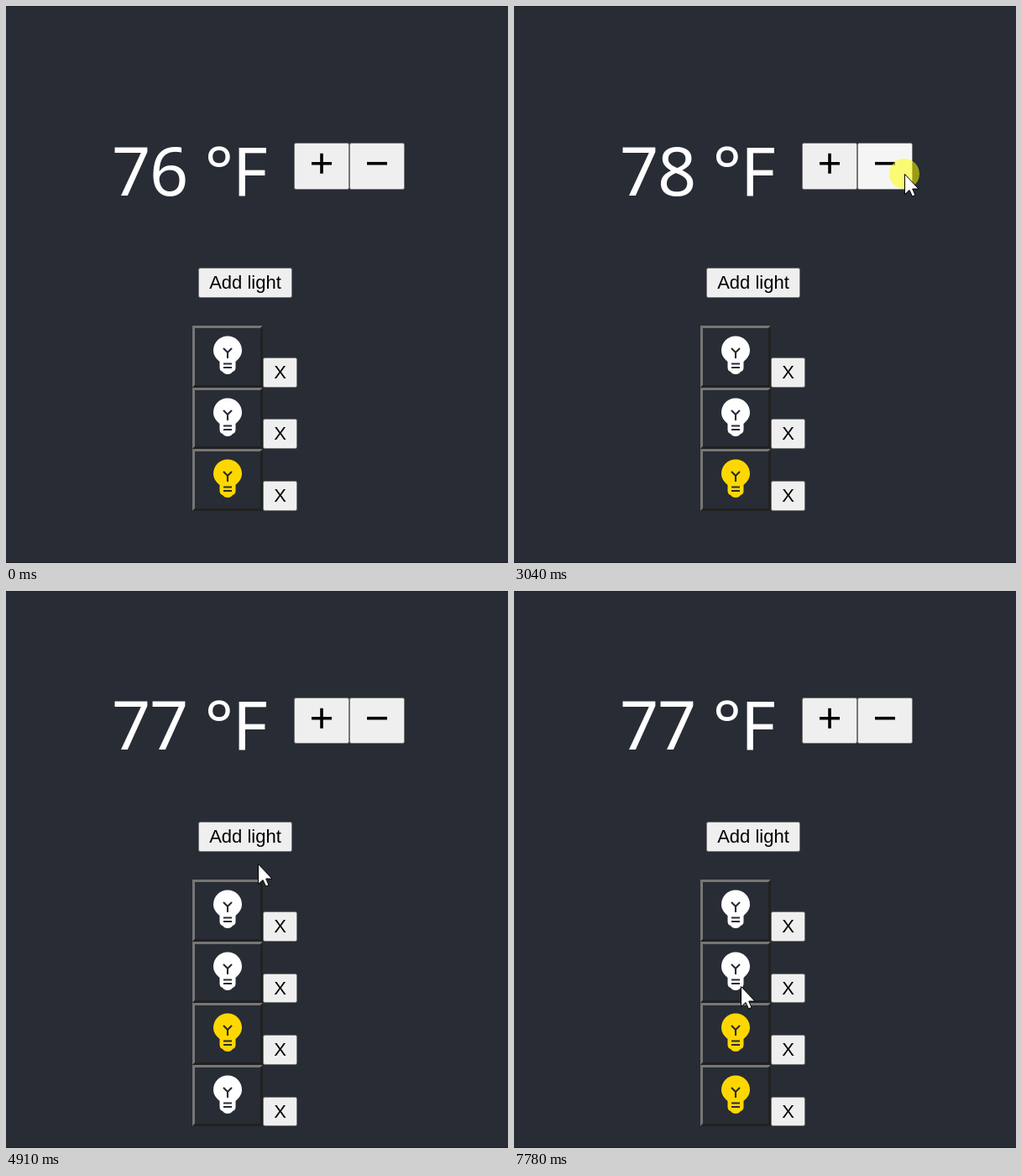
These frames come from a looping animation (598x664 px, 8 s). An HTML page:

```html
<!DOCTYPE html>
<html lang="en">
<head>
<meta charset="utf-8">
<title>Thermostat and lights</title>
<style>
  html, body { margin: 0; width: 100%; height: 100%; overflow: hidden; background: #282c34; }
  svg { display: block; width: 598px; height: 664px; }
  .temp { font: 400 81px "Noto Sans", "Open Sans", sans-serif; letter-spacing: -1.3px; fill: #fff; }
  .label { font: 22px "Liberation Sans", Arial, sans-serif; text-anchor: middle; fill: #000; }
</style>
</head>
<body>
<svg id="stage" viewBox="0 0 598 664" xmlns="http://www.w3.org/2000/svg"></svg>
<script>
const LOOP = 8000, ROW = 73.5, ADDED = 4910;
const stage = document.getElementById('stage');

function set(el, attrs) {
  for (const k in attrs) el.setAttribute(k, attrs[k]);
}
function add(parent, tag, attrs, text) {
  const el = document.createElementNS('http://www.w3.org/2000/svg', tag);
  set(el, attrs);
  if (text) el.textContent = text;
  parent.appendChild(el);
  return el;
}
const show = (el, on) => set(el, { visibility: on ? 'visible' : 'hidden' });
const moveTo = (el, x, y) => set(el, { transform: `translate(${x} ${y})` });

// Snap a vertical span to whole pixels, as page layout does
function snap(y, h) {
  const top = Math.round(y);
  return [top, Math.round(y + h) - top];
}

function makeButton(x, y, w, h, text) {
  const g = add(stage, 'g', {});
  const face = add(g, 'rect', { x: 0.5, y: 0.5, width: w - 1, rx: 2, stroke: '#767676' });
  if (text) add(g, 'text', { class: 'label', x: w / 2, y: 25 }, text);
  return { g, face, x, y, w, h };
}

function makeLight(i) {
  const y = 381.2 + i * ROW;
  const g = add(stage, 'g', {});
  const lit = add(g, 'path', {}), shade = add(g, 'path', {});
  const bulb = add(g, 'path', {
    d: 'M25 29.5A17 17 0 1 1 59 29.5C59 36 55 40 51.5 43V50Q51.5 54 48 55Q46 58 42 58' +
       'Q38 58 36 55Q32.5 54 32.5 50V43C29 40 25 36 25 29.5Z'
  });
  add(g, 'path', {
    d: 'M37 27L42 32L47 27M42 32V39M37 45.5H47M37 50H47',
    fill: 'none', stroke: '#282c34', 'stroke-width': 2.1
  });
  return { g, lit, shade, bulb, y, remove: makeButton(306, y + 37.6, 41, 35.9, 'X') };
}

add(stage, 'rect', { width: 598, height: 664, fill: '#282c34' });
for (const y of [0, 663]) add(stage, 'rect', { y, width: 598, height: 1, fill: '#1e2128' });

const temp = add(stage, 'g', { class: 'temp' });
const degrees = add(temp, 'text', { x: 126 }, '76');
add(temp, 'text', { x: 236.5 }, '°F');

const plus = makeButton(343, 163.4, 66, 55.3);
const minus = makeButton(409, 163.4, 66, 55.3);
const sign = { fill: 'none', stroke: '#000', 'stroke-width': 3.6 };
add(plus.g, 'path', { d: 'M21 24.7H45M33 12.7V36.7', ...sign });
add(minus.g, 'path', { d: 'M21 24.7H45', ...sign });
const addLight = makeButton(229, 312, 112, 35.9, 'Add light');
const lights = Array.from({ length: 4 }, (_, i) => makeLight(i));
const buttons = [plus, minus, addLight, ...lights.map(l => l.remove)];

const halo = add(stage, 'circle', { r: 18, fill: '#ff0', 'fill-opacity': 0.53 });
const cursor = add(stage, 'path', {
  d: 'M0.5 0.5V24.5L6 19.5L9.5 27L13 25.5L9.7 18H17Z',
  fill: '#fff', stroke: '#000', 'stroke-width': 1
});

// Each move goes on from where the last one ended; px, py: ease-out power per axis
const entry = { x: 522, y: 696 };
const moves = [
  { begin: 440, end: 1100, steps: 9, x: 380, y: 212 },
  { begin: 2730, end: 2810, steps: 2, x: 465, y: 200 },
  { begin: 3750, end: 4370, steps: 9, x: 300, y: 325, px: 5.5, py: 2.2 },
  { begin: 5980, end: 6530, steps: 8, x: 272, y: 586 },
  { begin: 7570, end: 7780, steps: 4, x: 270, y: 471 }
];
const presses = [[1480, 1710], [2180, 2350], [3040, 3270], [4680, ADDED], [6770, 7020]];

const easeOut = (u, power = 2) => 1 - (1 - u) ** power;
const mix = (a, b, u) => Math.round(a + (b - a) * u);

function pointerAt(t) {
  const i = moves.filter(m => t >= m.begin).length - 1;
  if (i < 0) return null;
  const m = moves[i], from = moves[i - 1] || entry;
  const gap = (m.end - m.begin) / (m.steps - 1);
  const u = Math.min(1, (Math.floor((t - m.begin + 4) / gap) + 1) / m.steps);
  return { x: mix(from.x, m.x, easeOut(u, m.px)), y: mix(from.y, m.y, easeOut(u, m.py)) };
}

function draw(t) {
  const pos = pointerAt(t);
  const down = presses.some(([a, b]) => t >= a && t < b);
  const grown = t >= ADDED;
  const lift = grown ? ROW / 2 : 0;

  degrees.textContent = 76 + (t >= 1710) + (t >= 2350) - (t >= 3270);
  moveTo(temp, 0, Math.round(225.8 - lift));

  for (const b of buttons) {
    const [y, h] = snap(b.y - lift, b.h);
    const over = pos && pos.x >= b.x && pos.x < b.x + b.w && pos.y >= y && pos.y < y + h;
    moveTo(b.g, b.x, y);
    set(b.face, { height: h - 1, fill: over ? (down ? '#f5f5f5' : '#e5e5e5') : '#efefef' });
  }

  lights.forEach((l, i) => {
    const [y, h] = snap(l.y - lift, ROW);
    const on = i === 2 || (i === 3 && t >= 7020);
    const pushed = i === 3 && grown && down;
    moveTo(l.g, 222, y);
    set(l.bulb, { fill: on ? '#ffd700' : '#fff' });
    set(l.lit, { d: `M0 ${h}V0H84L81 3H3V${h - 3}Z`, fill: pushed ? '#212121' : '#767676' });
    set(l.shade, { d: `M84 0V${h}H0L3 ${h - 3}H81V3Z`, fill: pushed ? '#767676' : '#212121' });
    show(l.g, i < 3 || grown);
    show(l.remove.g, i < 3 || grown);
  });

  show(cursor, !!pos);
  show(halo, down);
  if (pos) [cursor, halo].forEach(el => moveTo(el, pos.x, pos.y));
}

const start = performance.now();
function tick() {
  draw((performance.now() - start) % LOOP);
  requestAnimationFrame(tick);
}
tick();
</script>
</body>
</html>
```
